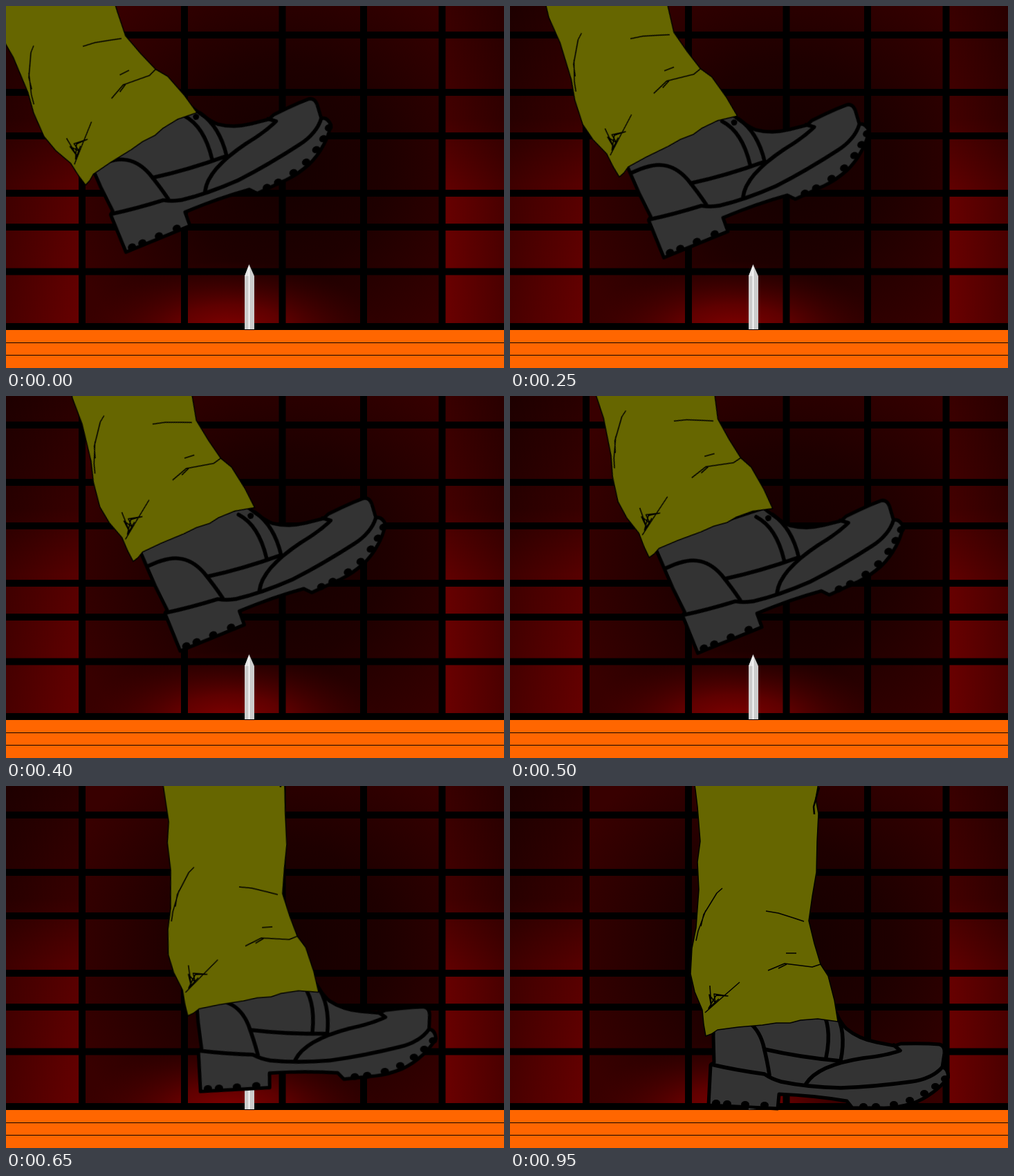
An HTML page without scripts that plays this animation: 720x524 px, repeating every 1.5 s.

```html
<!DOCTYPE html>
<html lang="en">
<head>
<meta charset="utf-8">
<title>Boot and spike</title>
<style>
  html, body { margin: 0; width: 100%; height: 100%; overflow: hidden; background: #000; }
  svg { display: block; width: 100%; height: 100%; }

  .boot, .leg, .flash { animation: 1500ms infinite; }
  .boot { animation-name: boot; }
  .leg { animation-name: leg; }
  .flash { animation-name: flash; animation-timing-function: step-end; opacity: 0; }

  /* The picture advances every 50 ms: glide, then stomp. */
  @keyframes boot {
    0% { transform: translate(319px, 217px) rotate(-25.2deg); animation-timing-function: steps(10); }
    33.333% { transform: translate(417.5px, 233.5px) rotate(-25deg); animation-timing-function: steps(2); }
    40% { transform: translate(451px, 319px) rotate(-12deg); animation-timing-function: steps(2); }
    46.666%, 100% { transform: translate(478px, 398px) rotate(0deg); }
  }
  @keyframes leg {
    0% { transform: translate(112px, 58px) rotate(-26.8deg); animation-timing-function: steps(10); }
    33.333% { transform: translate(238px, 36px) rotate(-15.4deg); animation-timing-function: steps(2); }
    40% { transform: translate(305px, 111px) rotate(-8deg); animation-timing-function: steps(2); }
    46.666%, 100% { transform: translate(371px, 181px) rotate(0deg); }
  }
  @keyframes flash {
    0% { opacity: 0; }
    46.666% { opacity: .5; }
    63.333%, 100% { opacity: 0; }
  }
</style>
</head>
<body>
<svg viewBox="0 0 720 524" preserveAspectRatio="none">
  <defs>
    <radialGradient id="base" gradientUnits="userSpaceOnUse" cx="400" cy="230" r="330">
      <stop stop-color="#140000"/>
      <stop offset=".45" stop-color="#1e0000"/>
      <stop offset="1" stop-color="#380000"/>
    </radialGradient>
    <linearGradient id="left" x2="0" y2="1">
      <stop stop-color="#2a0000"/>
      <stop offset=".35" stop-color="#380000"/>
      <stop offset=".55" stop-color="#580000"/>
      <stop offset="1" stop-color="#680000"/>
    </linearGradient>
    <linearGradient id="right" x2="0" y2="1">
      <stop stop-color="#3a0000"/>
      <stop offset=".35" stop-color="#440000"/>
      <stop offset=".6" stop-color="#680000"/>
      <stop offset="1" stop-color="#6c0000"/>
    </linearGradient>
    <linearGradient id="shade">
      <stop stop-opacity="0"/>
      <stop offset="1" stop-opacity=".3"/>
    </linearGradient>
    <radialGradient id="glow">
      <stop stop-color="#880000"/>
      <stop offset=".4" stop-color="#700000" stop-opacity=".75"/>
      <stop offset="1" stop-color="#400000" stop-opacity="0"/>
    </radialGradient>
    <ellipse id="lug" rx="6" ry="5"/>
  </defs>

  <!-- wall -->
  <rect width="720" height="469" fill="url(#base)"/>
  <ellipse cx="325" cy="474" rx="215" ry="105" fill="url(#glow)"/>
  <rect width="110" height="469" fill="url(#left)"/>
  <rect width="110" height="469" fill="url(#shade)" transform="matrix(-1 0 0 1 110 0)"/>
  <rect x="630" width="90" height="469" fill="url(#right)"/>
  <rect x="630" width="90" height="469" fill="url(#shade)"/>
  <path d="M110 0V469M258 0V469M399.500 0V469M517 0V469M630.500 0V469
    M0 42H720M0 125H720M0 188H720M0 271H720M0 320H720M0 384.500H720M0 464H720"
    fill="none" stroke="#000" stroke-width="10"/>

  <!-- floor -->
  <rect y="469" width="720" height="55" fill="#f60"/>
  <path d="M0 487.500H720M0 505.500H720" stroke="#100400"/>

  <!-- spike -->
  <path d="M351.500 374L359 391V468H345V391Z" fill="#ccc"/>
  <path d="M351.500 374L345 391H351.500Z" fill="#e4e4e4"/>
  <path d="M351.500 378V468" stroke="#fff" stroke-width="1.500"/>

  <g class="boot">
    <g transform="translate(-478 -398)" stroke="#000" stroke-linejoin="round" stroke-linecap="round">
      <path fill="#333" stroke-width="5" d="M295 400L294 362L296 292L462 312
        Q476 340 486 351Q504 366 530 371L556 376L565 373Q600 372 621 374Q629 376 628 387L625 407
        Q634 409 633.500 422Q622 436 612 443Q596 455 580 460Q556 467 535 466L495 466L487 456
        Q440 448 389 446L387 467L287 462L290 404Z"/>
      <g fill="none" stroke-width="5.500">
        <path d="M291 403Q325 411 368 417Q378 424 392 428Q430 436 478 437Q530 435 580 428Q610 424 625 407"/>
        <path d="M297 331Q328 331 342 340Q359 350 366 374Q372 398 375 418"/>
        <path d="M368 381Q420 393 478 398"/>
        <path d="M447 319Q467 345 457 393M470 326Q487 355 478 398"/>
        <path d="M555 375L564 383Q545 390 510 394Q445 404 428 431"/>
      </g>
      <circle cx="462" cy="328" r="4"/>
      <g stroke="none">
        <use href="#lug" x="298" y="459"/>
        <use href="#lug" x="314" y="460"/>
        <use href="#lug" x="340" y="461"/>
        <use href="#lug" x="368" y="462"/>
        <use href="#lug" x="511" y="464"/>
        <use href="#lug" x="529" y="464"/>
        <use href="#lug" x="555" y="461"/>
        <use href="#lug" x="578" y="455"/>
        <use href="#lug" x="599" y="445"/>
        <use href="#lug" x="615" y="435"/>
        <use href="#lug" x="629" y="424"/>
      </g>
    </g>
  </g>

  <g class="leg">
    <g transform="translate(-371 -181)" stroke="#000" stroke-width="1.500" stroke-linejoin="round">
      <path fill="#660" d="M264 -20L268 5L271 30L275 80L271 110L273 150L269 205L263 235L261 272L267 298
        L278 324L280 345L283 362L291 359L300 353L330 349L365 346L385 343L405 343L420 339L445 337L474 341
        L469 310L460 275L449 258L440 228L432 195L437 160L443 125L444 80L446 40L442 18L449 -20Z"/>
      <g fill="none">
        <path d="M307 148L299 155L280 186L276 203M283 180L272 210L269 224"/>
        <path d="M370 181L388 184L410 191L425 196"/>
        <path d="M399 242H414"/>
        <path d="M373 267L397 257L437 262L449 258M388 264L400 258"/>
        <path d="M332 284L308 305L282 328M289 289L291 320L288 302L297 314L295 301L315 304L298 303L287 322L302 308"/>
        <path d="M447 2L439 30L440 41" stroke-width="2.500"/>
      </g>
    </g>
  </g>

  <rect class="flash" width="720" height="524" fill="#f00"/>
</svg>
</body>
</html>
```
